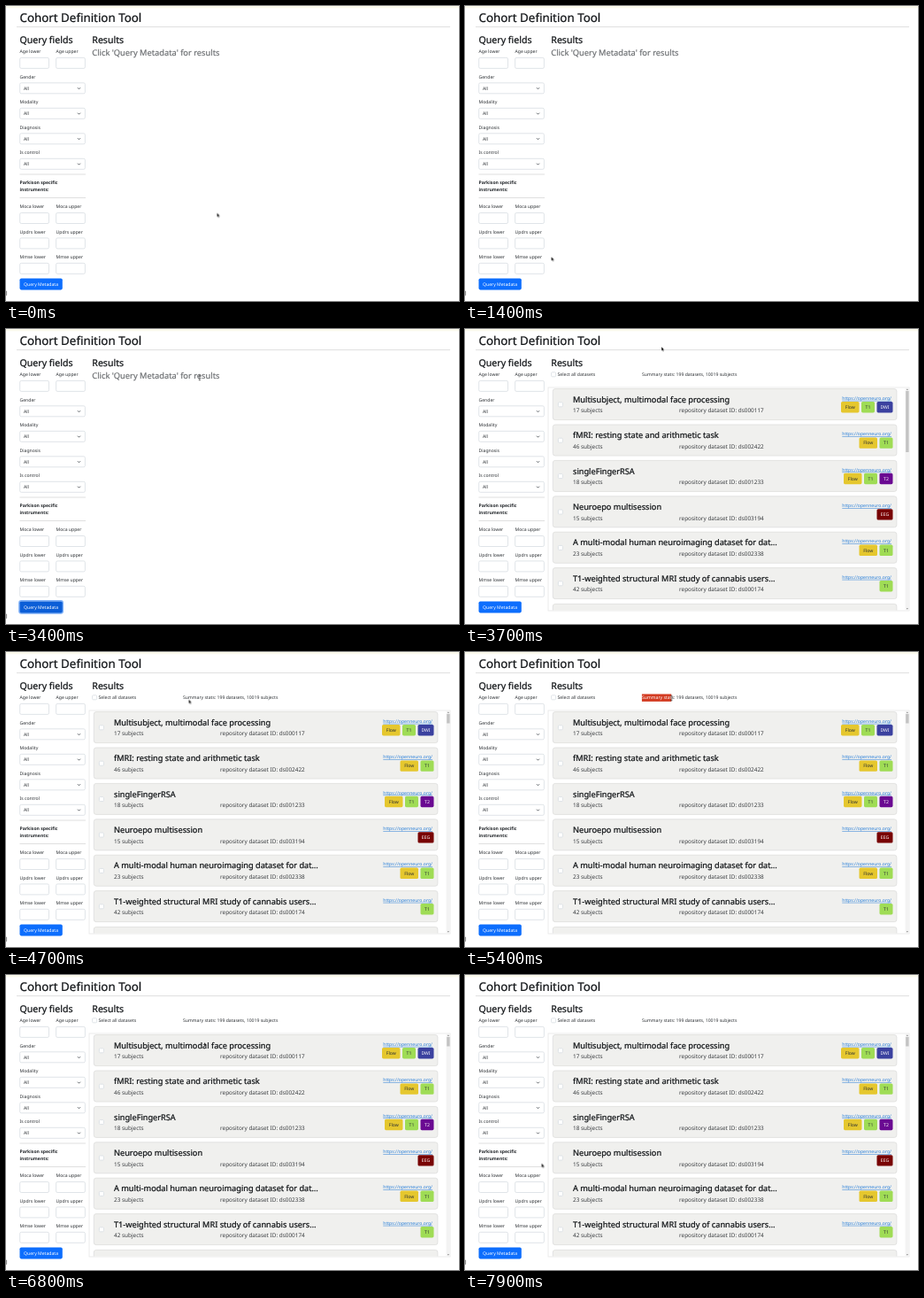
An HTML page that plays this animation: 512x333 px, repeating every 8000 ms.

```html
<!DOCTYPE html>
<html lang="en">
<head>
<meta charset="utf-8">
<title>Cohort Definition Tool</title>
<style>
html, body { margin: 0; width: 100%; height: 100%; overflow: hidden; background: #fff; }
svg { display: block; width: 512px; height: 333px; }
text { font: 5.12px "Noto Sans", "Open Sans", sans-serif; fill: #2c3034; text-rendering: geometricPrecision; white-space: pre; }
.h1, .h2, .h3 { fill: #111417; stroke: #111417; stroke-width: .24px; }
.h1 { font-size: 13.35px; }
.h2 { font-size: 10.6px; }
.h3 { font-size: 9.2px; }
.hint { font-size: 9.29px; fill: #6b6e71; stroke: #6b6e71; stroke-width: .18px; }
.sub { font-size: 6.42px; fill: #3a3d40; }
.bold { font-weight: 700; fill: #212529; }
.link { fill: #2a7fd8; text-anchor: end; text-decoration: underline; }
.tag { text-anchor: middle; }
.light { fill: #fff; }
.field { fill: #fff; stroke: #d9dde2; stroke-width: .8px; }
.rule { stroke: #dcdcdc; stroke-width: .9px; }
.card { fill: #f0f0ee; stroke: #dededc; stroke-width: .8px; }

.before, .after, .mark, .thumb, .arrow, .hand, .beam, .ring, .button, .picked, .cursor {
  animation: 8s step-end infinite;
}
.before { animation-name: before; }
.after { animation-name: after; }
.mark { fill: none; stroke: #555; stroke-width: .7px; animation-name: mark; }
.thumb { fill: #c3c3c3; animation-name: thumb; }
.button { fill: #0d6efd; animation-name: button; }
.ring { fill: none; stroke: #7db0f8; stroke-width: 1.5px; animation-name: ring; }
.picked { animation-name: pick; }
.cursor { animation-name: move; }
.arrow { animation-name: arrow; }
.hand { animation-name: hand; }
.beam { animation-name: beam; }

@keyframes before { 0% { opacity: 1 } 46.25%, 100% { opacity: 0 } }
@keyframes after { 0% { opacity: 0 } 46.25%, 100% { opacity: 1 } }
@keyframes mark { 0% { opacity: 1 } 46.25% { opacity: 0 } 51.25%, 100% { opacity: 1 } }
@keyframes thumb { 0% { height: 69px } 47.5%, 100% { height: 10.5px } }
@keyframes button {
  0% { fill: #0d6efd } 23.75% { fill: #0c66ea } 25% { fill: #0b5ed7 }
  28.75% { fill: #0a58ca } 31.25% { fill: #0b5ed7 } 46.25%, 100% { fill: #0d6efd }
}
@keyframes ring {
  0% { opacity: 0 } 28.75% { opacity: .4 } 30% { opacity: .8 }
  31.25% { opacity: 1 } 46.25%, 100% { opacity: 0 }
}
@keyframes pick {
  0% { clip-path: inset(0 100% 0 0) }
  67.5% { clip-path: inset(0 69% 0 0) }
  68.75% { clip-path: inset(0 39% 0 0) }
  70% { clip-path: inset(0 9% 0 0) }
  72.5% { clip-path: inset(0) }
  80%, 100% { clip-path: inset(0 100% 0 0) }
}
@keyframes arrow {
  0% { opacity: 1 } 23.75% { opacity: 0 } 37.5% { opacity: 1 } 42.5% { opacity: 0 }
  46.25% { opacity: 1 } 66.25% { opacity: 0 } 73.75%, 100% { opacity: 1 }
}
@keyframes hand { 0% { opacity: 0 } 23.75% { opacity: 1 } 37.5%, 100% { opacity: 0 } }
@keyframes beam {
  0% { opacity: 0 } 42.5% { opacity: 1 } 46.25% { opacity: 0 }
  66.25% { opacity: 1 } 73.75%, 100% { opacity: 0 }
}
@keyframes move {
  0% { transform: translate(238.4px, 233.5px) }
  2.5% { transform: translate(281px, 169px) }
  7.5% { transform: translate(281px, 169px); animation-timing-function: steps(4, start) }
  12.5% { transform: translate(266px, 171px) }
  13.75% { transform: translate(266px, 171px); animation-timing-function: steps(4, start) }
  18.75% { transform: translate(97.5px, 283px); animation-timing-function: steps(5, start) }
  25% { transform: translate(56.5px, 312px) }
  37.5% { transform: translate(56.5px, 312px); animation-timing-function: steps(5, start) }
  43.75% { transform: translate(218.8px, 55px) }
  46.25% { transform: translate(222px, 20px) }
  47.5% { transform: translate(222px, 20px); animation-timing-function: steps(2, start) }
  50% { transform: translate(213px, 32px) }
  51.25% { transform: translate(213px, 32px); animation-timing-function: steps(3, start) }
  55% { transform: translate(206px, 50px) }
  56.25% { transform: translate(206px, 50px); animation-timing-function: steps(3, start) }
  60% { transform: translate(206.5px, 53.5px); animation-timing-function: steps(6, start) }
  67.5% { transform: translate(201px, 52px); animation-timing-function: steps(3, start) }
  71.25% { transform: translate(298px, 52px) }
  72.5% { transform: translate(298px, 52px); animation-timing-function: steps(3, start) }
  76.25% { transform: translate(348.7px, 53px) }
  80% { transform: translate(348.7px, 53px); animation-timing-function: steps(6, start) }
  87.5% { transform: translate(199px, 80.5px) }
  90% { transform: translate(199px, 80.5px); animation-timing-function: steps(3, start) }
  93.75% { transform: translate(194.5px, 86.5px) }
  95% { transform: translate(173px, 103px) }
  97.5% { transform: translate(173px, 103px); animation-timing-function: steps(2, start) }
  100% { transform: translate(86.5px, 212.5px) }
}
</style>
</head>
<body>
<script>
const text = (x, y, s, cls = '') => `<text x="${x}" y="${y}" class="${cls}">${s}</text>`;
const rect = (x, y, w, h, attrs, r = 0) =>
  `<rect x="${x}" y="${y}" width="${w}" height="${h}" rx="${r}" ${attrs}/>`;
const field = (x, y, w, h = 12, r = 1.6) => rect(x, y, w, h, 'class="field"', r);
const rule = (x1, x2, y) => `<path class="rule" d="M${x1} ${y}H${x2}"/>`;

const pair = (name, y) =>
  text(15.5, y, name + ' lower') + text(56.5, y, name + ' upper') +
  field(15.7, y + 5.2, 32.8) + field(56.6, y + 5.2, 32.8);

const select = (name, i) => {
  const y = 81.8 + i * 28.5;
  return text(15.5, y, name) + field(15.7, y + 5, 73.7) + text(20, y + 12.9, 'All') +
    `<path d="M81 ${y + 10.4}l1.5 1.5 1.5-1.5" fill="none" stroke="#343a40" stroke-width=".8"/>`;
};

const tags = {
  Flow: [20.5, '#e5c72e'], T1: [15, '#9fdc55'], T2: [15, '#6a0a92', 'light'],
  DWI: [18, '#3b419f', 'light'], EEG: [18, '#780303', 'light'],
};

// Tags are laid out from the right edge of the card.
const tagRow = (names, y) => {
  let right = 483.5;
  return names.split(' ').reverse().map(name => {
    const [w, color, tone = ''] = tags[name];
    const x = right - w;
    right = x - 2.5;
    return rect(x, y, w, 12.4, `fill="${color}"`, 1.6) +
      text(x + w / 2, y + 8, name, 'tag ' + tone);
  }).join('');
};

const card = ([title, count, id, names], i) => {
  const y = 67.6 + i * 40.4;
  return rect(99.3, y, 388.6, 35, 'class="card"', 2.6) +
    field(105.4, y + 15.2, 5, 5, 1) +
    text(122, y + 15.1, title, 'h3') +
    text(122, y + 26.8, count + ' subjects', 'sub') +
    text(242, y + 26.8, 'repository dataset ID: ' + id, 'sub') +
    text(482, y + 12.2, 'https://openneuro.org/', 'link') +
    tagRow(names, y + 14.4);
};

const studies = [
  ['Multisubject, multimodal face processing', 17, 'ds000117', 'Flow T1 DWI'],
  ['fMRI: resting state and arithmetic task', 46, 'ds002422', 'Flow T1'],
  ['singleFingerRSA', 18, 'ds001233', 'Flow T1 T2'],
  ['Neuroepo multisession', 15, 'ds003194', 'EEG'],
  ['A multi-modal human neuroimaging dataset for dat…', 23, 'ds002338', 'Flow T1'],
  ['T1-weighted structural MRI study of cannabis users…', 42, 'ds000174', 'T1'],
];

const stats = 'Summary stats: 199 datasets, 10019 subjects';

const sidebar =
  text(15.5, 42.3, 'Query fields', 'h2') +
  pair('Age', 53.2) +
  ['Gender', 'Modality', 'Diagnosis', 'Is control'].map(select).join('') +
  rule(15.5, 90, 190) +
  text(15.5, 201.4, 'Parkison specific', 'bold') +
  text(15.5, 209.3, 'instruments:', 'bold') +
  rule(15.5, 90, 216.5) +
  ['Moca', 'Updrs', 'Mmse'].map((name, i) => pair(name, 228.3 + i * 28.4)).join('') +
  rect(14.9, 306.8, 49.4, 14.2, 'class="ring"', 2.4) +
  rect(15.5, 307.4, 48.3, 13, 'class="button"', 1.8) +
  text(20, 316, 'Query Metadata', 'light');

// The highlight sits slightly lower behind the counts than behind the label.
const highlight =
  rect(199.7, 47.3, 37.6, 8.6, 'fill="#d33b22"') +
  rect(237, 48.7, 70.6, 8.9, 'fill="#d33b22"') +
  text(200, 53.3, stats, 'light');

const results =
  field(97.6, 48.8, 5, 5, 1) +
  text(104.5, 53.3, 'Select all datasets') +
  text(200, 53.3, stats) +
  `<g class="picked">${highlight}</g>` +
  rect(94, 66, 408, 252, 'fill="none" stroke="#e6e6e6" stroke-width=".8"') +
  `<g clip-path="url(#list)">${studies.map(card).join('')}${rect(99.3, 310.4, 388.6, 35, 'class="card"', 2.6)}</g>` +
  rect(497.6, 66.4, 4.4, 251.2, 'fill="#f3f3f3"') +
  rect(498.2, 70, 3.4, 69, 'class="thumb"') +
  '<path d="M498.8 68.8l1.1-1.4 1.1 1.4z" fill="#777"/><path d="M498.8 315.2l1.1 1.4 1.1-1.4z" fill="#777"/>';

const cursor = `<g class="cursor">
  <path class="arrow" d="M0 0V4.7L1.1 3.7 1.9 5.5 2.8 5.1 2 3.4H3.5Z" fill="#111" stroke="#fff" stroke-width=".35"/>
  <path class="hand" d="M0 0q.6-.6 1 0v2l2.2.5q.7.2.6 1L3.4 5.6H.5L-1 3.4q0-.8 1-.2z" fill="#fff" stroke="#111" stroke-width=".45"/>
  <path class="beam" d="M-1-2.8H1M0-2.8V2.8M-1 2.8H1" fill="none" stroke="#222" stroke-width=".6"/>
</g>`;

document.body.innerHTML = `<svg viewBox="0 0 512 333">
  <clipPath id="list">${rect(94, 66, 408, 251.6, '')}</clipPath>
  ${rect(0, 0, 512, 2.4, 'fill="#fbfaec"')}
  ${text(15.5, 18, 'Cohort Definition Tool', 'h1')}
  ${rule(12, 502, 23.6)}
  ${sidebar}
  ${text(97.3, 42.3, 'Results', 'h2')}
  <path class="mark" d="M0 322h.6v4.4H0"/>
  <g class="before">${text(97.3, 56.2, "Click 'Query Metadata' for results", 'hint')}</g>
  <g class="after">${results}</g>
  ${cursor}
</svg>`;
</script>
</body>
</html>
```
